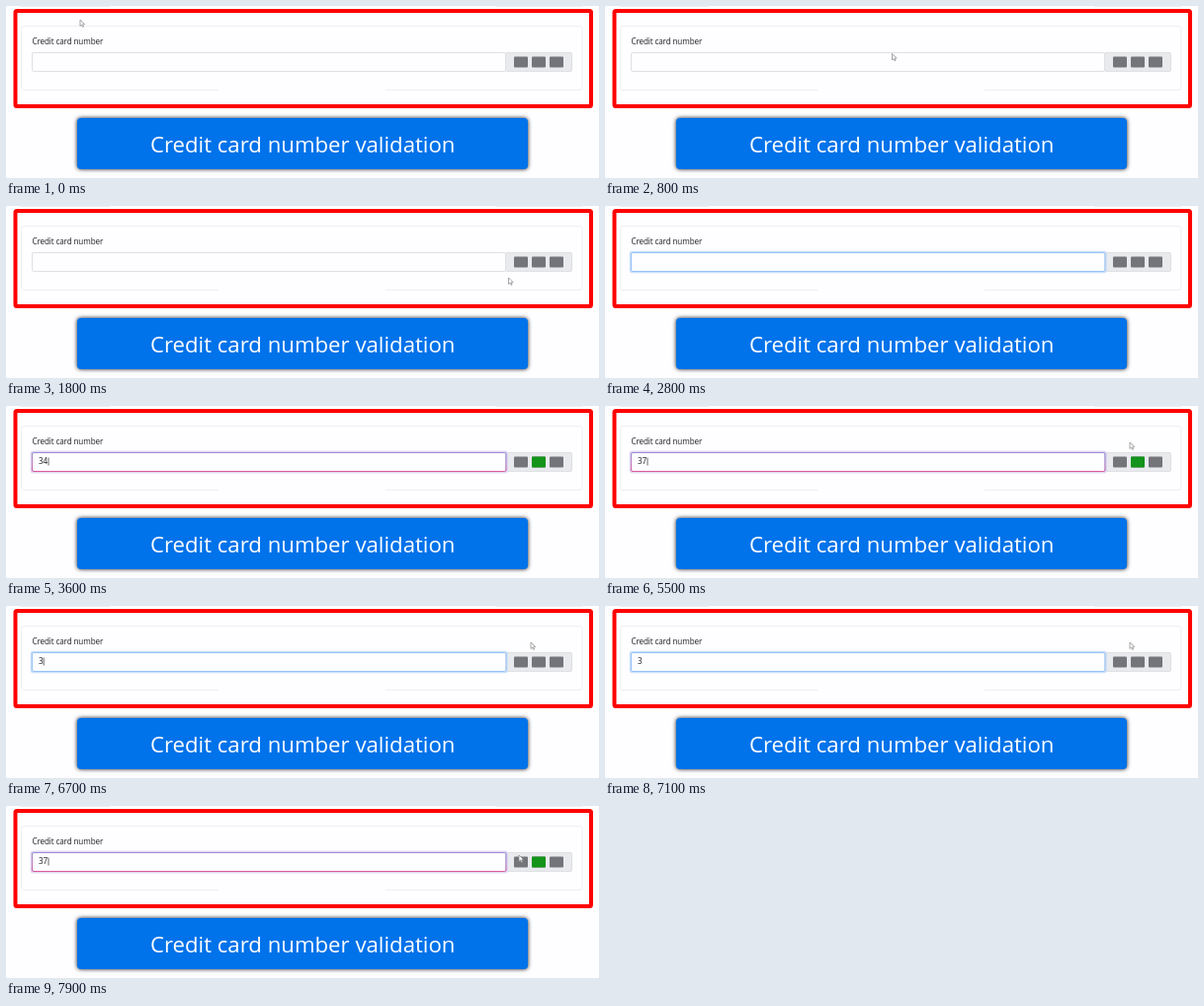
These frames come from a looping animation (600x175 px, 8000 ms). An HTML page:

```html
<!DOCTYPE html>
<html lang="en">
<head>
<meta charset="utf-8">
<title>Credit card number validation</title>
<style>
  html, body { margin: 0; width: 100%; height: 100%; overflow: hidden; background: #fefdff; }
  svg { display: block; width: 100vw; height: 100vh; }
  text { font-family: "Open Sans", "Noto Sans", sans-serif; }
  .small { font-size: 8.1px; letter-spacing: -.1px; fill: #1f2226; }
  .banner { filter: drop-shadow(0 .5px 2px rgba(0, 0, 0, .9)); }
</style>
</head>
<body>
<svg viewBox="0 0 600 175">
  <defs>
    <linearGradient id="invalid" x1="0" y1="0" x2="0" y2="1">
      <stop offset="0" stop-color="#9a90d8"/>
      <stop offset=".5" stop-color="#bd80c0"/>
      <stop offset="1" stop-color="#dc5c9d"/>
    </linearGradient>
  </defs>
  <rect width="600" height="175" fill="#fefdff"/>
  <path d="M15 .5H105M495 .5H583" stroke="#efeef1"/>
  <path d="M215 85.5H17.5Q15.5 85.5 15.5 83.5V22.5Q15.5 20.5 17.5 20.5H581Q583 20.5 583 22.5V83.5Q583 85.5 581 85.5H384"
        fill="none" stroke="#efeef1"/>
  <rect x="9.5" y="5" width="582.5" height="97" rx="1.5" fill="none" stroke="#fe0000" stroke-width="4"/>

  <text class="small" x="26.4" y="39.2">Credit card number</text>
  <rect x="505.5" y="47.5" width="67" height="19" rx="1.5" fill="#e9eaee" stroke="#dfe0e4"/>
  <rect x="26.5" y="47.5" width="479" height="19" rx="1.5" fill="#fefdff" stroke="#dfe0e4"/>
  <g id="focus" fill="none">
    <rect x="25.5" y="46.5" width="481.5" height="21" rx="2" stroke="#c6defa" stroke-width="1.4"/>
    <rect x="26.5" y="47.5" width="479.5" height="19" rx="1.5" stroke="#98c4f6"/>
  </g>
  <g id="error" fill="none">
    <rect x="25.5" y="46.5" width="481.5" height="21" rx="2" stroke="#e3d3ee" stroke-width="1.4"/>
    <rect x="26.5" y="47.5" width="479.5" height="19" rx="1.5" stroke="url(#invalid)"/>
  </g>
  <text id="digits" class="small" x="33" y="59.4"></text>
  <path id="caret" d="M0 52.5V60.5" stroke="#444" stroke-width=".8"/>

  <g fill="#74757b">
    <rect x="514" y="51.5" width="14" height="11" rx="1"/>
    <rect x="532" y="51.5" width="14" height="11" rx="1"/>
    <rect x="550" y="51.5" width="14" height="11" rx="1"/>
  </g>
  <rect id="match" x="532" y="51.5" width="14" height="11" rx="1" fill="#14941a"/>

  <path id="mouse" d="M0 0V6.4L1.5 5.1L2.6 7.4L3.6 6.9L2.6 4.8L4.6 4.6Z"
        fill="#fff" stroke="#888" stroke-width=".75" stroke-linejoin="round"/>

  <g class="banner">
    <rect x="72" y="114" width="456" height="52" rx="4" fill="#0072ea"/>
  </g>
  <text x="300.2" y="148.5" text-anchor="middle" font-size="22.2" fill="#fff">Credit card number validation</text>
</svg>
<script>
const LOOP = 8000, FOCUS = 2500, BLINK = 1060;
const $ = id => document.getElementById(id);
const clamp = v => Math.max(0, Math.min(1, v));
const ease = v => v * v * (3 - 2 * v);

// time, value
const typed = [[0, ""], [3300, "3"], [3500, "34"], [4740, "3"], [5400, "37"], [6300, "3"], [7300, "37"]];
// time, x, y
const route = [
  [0, 75, 14], [100, 75, 14], [900, 300, 50], [1600, 508.5, 73], [1800, 508.5, 73],
  [2200, 556, 50], [2400, 500, 56],
  [3800, 500, 56], [4400, 531, 37], [7400, 531, 37], [7850, 519, 50], [8000, 519, 50]
];

function mouseAt(t) {
  const i = Math.max(1, route.findIndex(p => p[0] > t));
  const [t0, x0, y0] = route[i - 1], [t1, x1, y1] = route[i];
  const k = ease(clamp((t - t0) / (t1 - t0)));
  return [x0 + (x1 - x0) * k, y0 + (y1 - y0) * k];
}

// Two digits match a card; the highlight fades after each edit.
function matchAt(t) {
  let level = 0;
  for (const [start, value] of typed) {
    if (t < start) break;
    const goal = value.length > 1 ? 1 : 0;
    level += (goal - level) * clamp((t - start) / (goal ? 100 : 200));
  }
  return level;
}

function draw(t) {
  const value = typed.filter(s => s[0] <= t).pop()[1];
  const match = matchAt(t);
  const phase = ((t - 3200) % BLINK + BLINK) % BLINK;
  const [x, y] = mouseAt(t);

  $("digits").textContent = value;
  $("caret").setAttribute("transform", `translate(${33.4 + value.length * 4.8} 0)`);
  $("caret").setAttribute("opacity", t >= FOCUS && phase < BLINK / 2 ? 1 : 0);
  $("focus").setAttribute("opacity", clamp((t - FOCUS) / 150));
  $("error").setAttribute("opacity", Math.cbrt(match));
  $("match").setAttribute("opacity", match);
  $("mouse").setAttribute("transform", `translate(${x} ${y})`);
  $("mouse").setAttribute("opacity", t < 2400 || t > 3800 ? 1 : 0);
}

const begin = performance.now();
function tick() {
  draw((performance.now() - begin) % LOOP);
  requestAnimationFrame(tick);
}
draw(0);
requestAnimationFrame(tick);
</script>
</body>
</html>
```
